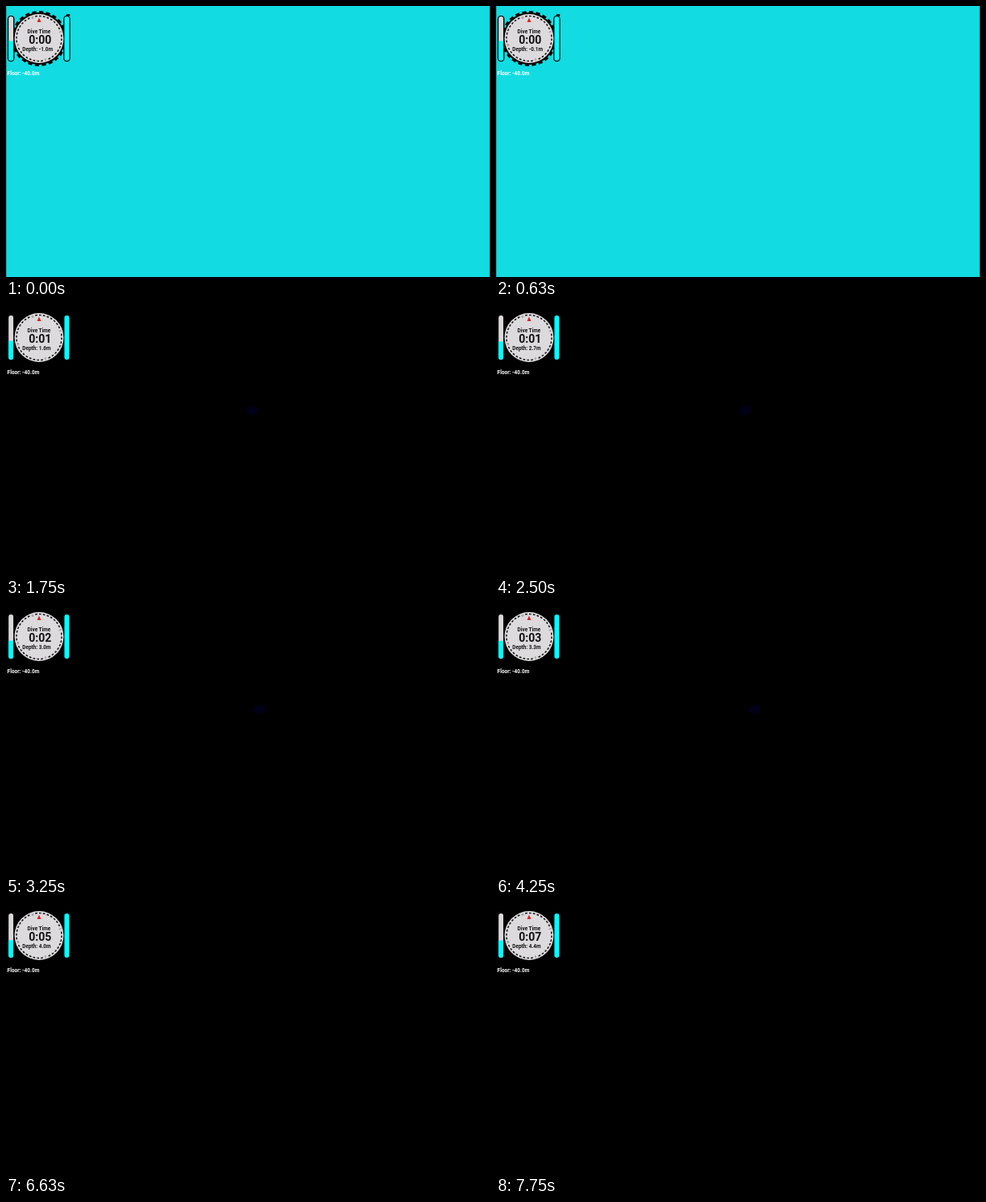
An HTML page that plays this animation: 600 px wide and 337 px high, repeating every 8 s.

```html
<!DOCTYPE html>
<html lang="en">
<head>
<meta charset="utf-8">
<title>Dive watch</title>
<style>
  html, body { margin: 0; width: 100%; height: 100%; overflow: hidden; background: #000; }
  svg { display: block; width: 600px; height: 337px; }
  text { font: 700 6.45px Roboto, sans-serif; fill: #111; }
  #time { font-size: 14px; }
  #floor { font-size: 6.5px; fill: #fff; }
  .mark { font-size: 4px; font-weight: 500; fill: #777; text-anchor: middle; }
</style>
</head>
<body>
<svg viewBox="0 0 600 337">
  <defs>
    <filter id="soft" x="-50%" y="-50%" width="200%" height="200%"><feGaussianBlur stdDeviation="1.5"/></filter>
    <clipPath id="tube"><rect x="3.2" y="13" width="6" height="55" rx="3"/></clipPath>
  </defs>
  <rect id="sky" x=".25" width="599.5" height="337" fill="#12dce1"/>
  <ellipse id="glow" rx="8" ry="5.5" fill="#000014" filter="url(#soft)"/>

  <g stroke="#000" stroke-width="2.6">
    <rect x="3.2" y="13" width="6" height="55" rx="3"/>
    <rect x="72.4" y="13" width="6" height="55" rx="3"/>
    <path d="M74.8 11.3h4.4" stroke-width="2.2"/>
  </g>
  <circle cx="41" cy="40.5" r="32.4"/>
  <circle cx="41" cy="40.5" r="33" fill="none" stroke="#000" stroke-width="3" pathLength="96" stroke-dasharray="2.4 1.6"/>

  <g clip-path="url(#tube)">
    <rect x="3" y="13" width="6.4" height="55" fill="#dcd8da"/>
    <rect id="fill" x="3" width="6.4" height="40" fill="#0ff"/>
  </g>
  <rect x="72.4" y="13" width="6" height="55" rx="3" fill="#0ff"/>

  <circle cx="41" cy="40.5" r="30.4" fill="#dcdadc"/>
  <circle cx="41" cy="40.5" r="28" fill="none" stroke="#111" stroke-width="1.5" pathLength="72" stroke-dasharray="1.1 .9"/>
  <g id="marks"></g>
  <path d="M41 14.8l2.5 5.2h-5z" fill="#d82020"/>
  <text x="26.6" y="34.2">Dive Time</text>
  <text id="time" x="28.3" y="47.1"></text>
  <text id="depth" x="20.3" y="55.6"></text>
  <text id="floor" x="1.6" y="86">Floor: -40.0m</text>
</svg>
<script>
const LOOP = 8, STEP = 0.125, SPLASH = 0.75; // seconds
const $ = id => document.getElementById(id);

// A fast fall from above the surface, then a slow sink.
const depthAt = s => Math.min(-1 + 1.47 * s, 1.95 + 0.31 * s);

[..."NESW"].forEach((letter, i) => {
  const turn = -17 + i * 90;
  $("marks").insertAdjacentHTML("beforeend",
    `<g transform="rotate(${turn} 41 40.5)"><rect x="39" y="11.4" width="4" height="3" fill="#dcdadc"/>
     <text class="mark" x="41" y="14.6">${letter}</text></g>`);
});

function draw(now) {
  const s = Math.floor((now % LOOP) / STEP) * STEP;
  const under = s >= SPLASH;
  const depth = depthAt(s);
  const seconds = under ? Math.floor(s - SPLASH) : 0;
  const fade = Math.max(0, Math.min(1, (7 - s) / 2.5));

  $("sky").style.display = under ? "none" : "";
  $("glow").setAttribute("transform", `translate(${294 + 6.2 * s} 131)`);
  $("glow").setAttribute("opacity", under ? fade : 0);
  $("fill").setAttribute("y", 43.5 + Math.max(0, depth) * 0.7);
  $("time").textContent = "0:" + String(seconds).padStart(2, "0");
  $("depth").textContent = `Depth: ${depth.toFixed(1)}m`;
}

const start = performance.now();
function tick() {
  draw((performance.now() - start) / 1000);
  requestAnimationFrame(tick);
}
tick();
</script>
</body>
</html>
```
